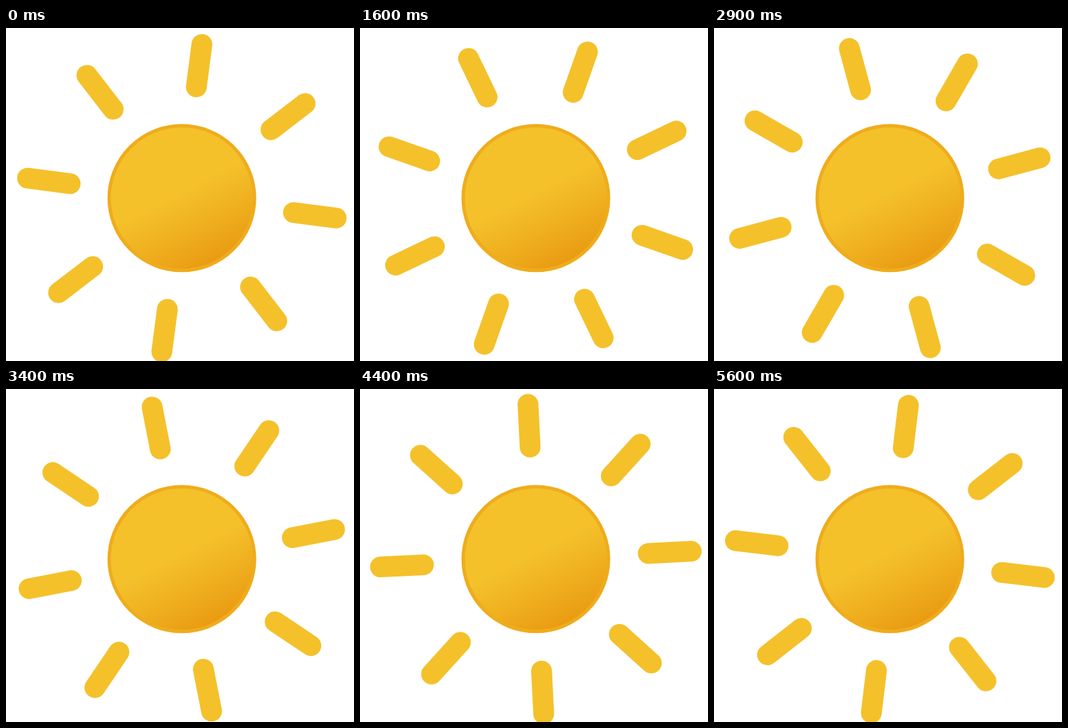
An HTML page that plays this animation: 510 by 490 pixels, repeating every 5700 ms.

```html
<!DOCTYPE html>
<html lang="en">
<head>
<meta charset="utf-8">
<title>Sun</title>
<style>
  html, body { margin: 0; width: 100%; height: 100%; overflow: hidden; background: #fff; }
  svg { display: block; }
</style>
</head>
<body>
<svg width="510" height="490" viewBox="0 0 510 490">
  <defs>
    <linearGradient id="shade" gradientUnits="userSpaceOnUse" x1="-4" y1="-8" x2="50" y2="96">
      <stop offset="0" stop-color="#f4c12b"/>
      <stop offset="0.5" stop-color="#efaf1f"/>
      <stop offset="1" stop-color="#e99a11"/>
    </linearGradient>
  </defs>
  <g transform="translate(257.7 250.3)">
    <g id="rays" stroke="#f4c12b" stroke-width="30.5" stroke-linecap="round"></g>
    <circle r="106.5" fill="url(#shade)" stroke="#efac1c" stroke-width="5"/>
  </g>
</svg>
<script>
  const LOOP = 5700, STEP = 100, COUNT = 8;
  const REST_ANGLE = 7.4, START_ANGLE = 6.37, DEGREES_PER_STEP = 0.812;
  const rays = document.getElementById('rays');

  for (let i = 0; i < COUNT; i++) {
    const ray = document.createElementNS('http://www.w3.org/2000/svg', 'line');
    ray.setAttribute('y1', -165);
    ray.setAttribute('y2', -228);
    ray.setAttribute('transform', `rotate(${i * 360 / COUNT})`);
    rays.append(ray);
  }

  function draw(time) {
    const step = Math.floor((time % LOOP) / STEP);
    // A short rest at the seam, then a steady turn.
    const angle = Math.max(REST_ANGLE, START_ANGLE + step * DEGREES_PER_STEP);
    rays.setAttribute('transform', `rotate(${angle})`);
  }

  const start = performance.now();
  function tick() {
    draw(performance.now() - start);
    requestAnimationFrame(tick);
  }
  tick();
</script>
</body>
</html>
```
